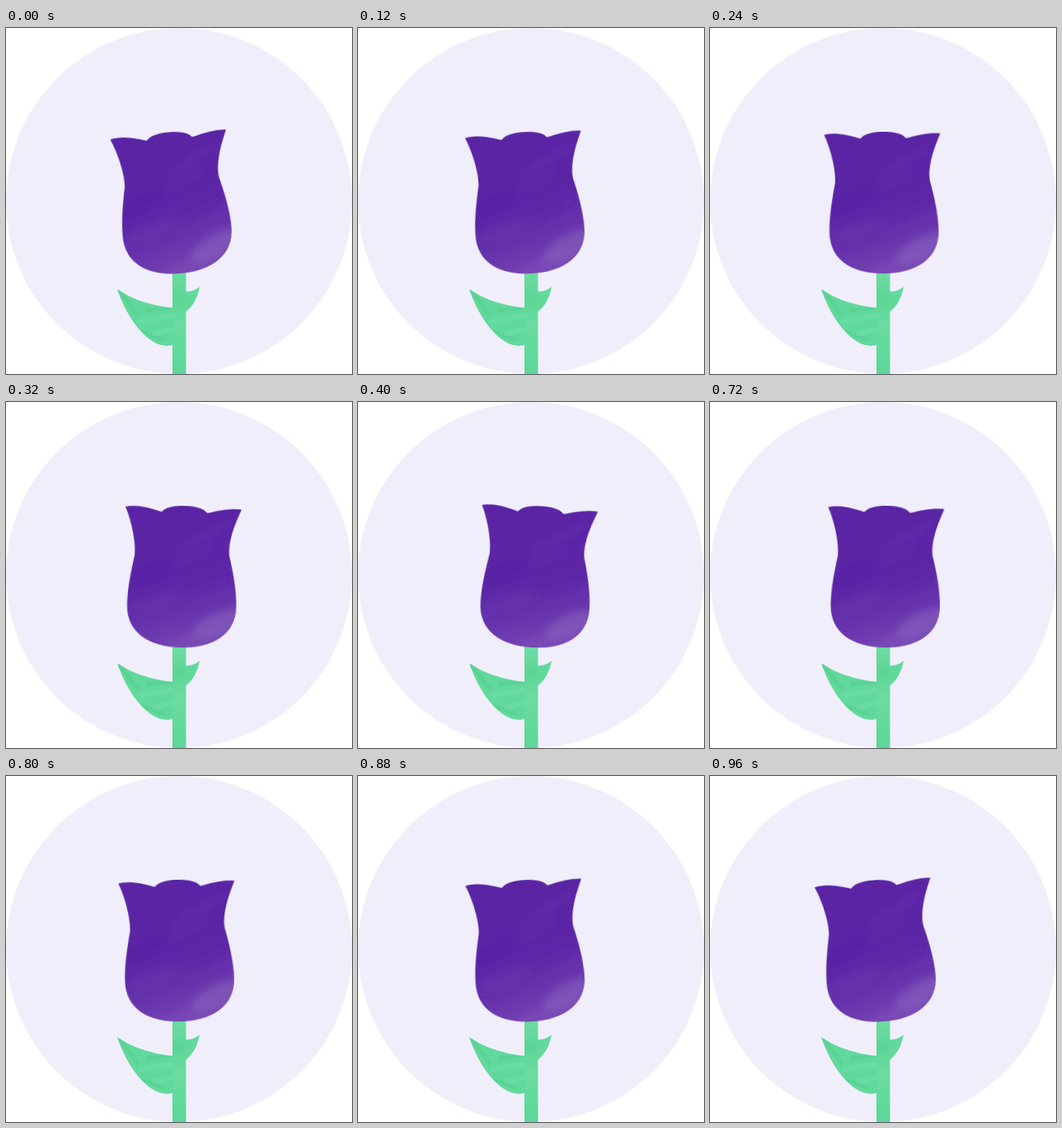
These frames come from a looping animation (420x420 px, 1 s). An HTML page:

```html
<!DOCTYPE html>
<html lang="en">
<head>
<meta charset="utf-8">
<title>Swaying tulip</title>
<style>
  html, body { margin: 0; width: 100%; height: 100%; overflow: hidden; background: #fff; }
  svg { display: block; width: 100%; height: 100%; }
  .bloom {
    transform-origin: 211px 297px;
    animation: sway 1s cubic-bezier(.364, 0, .636, 1) infinite;
  }
  @keyframes sway {
    0%, 100% { transform: rotate(-4.7deg); }
    52% { transform: rotate(4.7deg); }
  }
</style>
</head>
<body>
<svg viewBox="0 0 420 420">
  <defs>
    <linearGradient id="petal" gradientUnits="userSpaceOnUse" x1="185" y1="128" x2="242" y2="298">
      <stop offset="0" stop-color="#5a24a4"/>
      <stop offset=".48" stop-color="#5b25a6"/>
      <stop offset=".72" stop-color="#6632ac"/>
      <stop offset="1" stop-color="#7746b3"/>
    </linearGradient>
    <linearGradient id="stem" gradientUnits="userSpaceOnUse" x1="0" y1="298" x2="0" y2="420">
      <stop offset="0" stop-color="#6cdca2"/>
      <stop offset=".25" stop-color="#5dd596"/>
      <stop offset=".5" stop-color="#69dca1"/>
      <stop offset="1" stop-color="#5ed699"/>
    </linearGradient>
    <filter id="soft" x="-50%" y="-100%" width="200%" height="300%">
      <feGaussianBlur stdDeviation="4"/>
    </filter>
    <path id="head" d="M140 129 C153 126 168 129 184 134 C190 127 202 126 211.5 126
      C222 126 234 127 239.5 134 C255 130 268 127 281 128.6
      C276 141 265 166 268 186 C272 201 278 226 278 247
      C278 281 250 298 211.5 298 C172 298 145.5 281 145.5 247
      C145.5 227 149 208 153 187 C154 170 147 144 140 129Z"/>
    <path id="leaves" d="M135 317 C154 330 177 337 203 340 V384
      C198 387 190 386 183 383 C162 373 145 346 135 317Z
      M235 314 C229 319 224 320 217 320 V345 C227 339 233 326 235 314Z"/>
    <clipPath id="headClip"><use href="#head"/></clipPath>
    <clipPath id="leafClip"><use href="#leaves"/></clipPath>
  </defs>

  <circle cx="210" cy="210" r="210" fill="#f0eefa"/>

  <rect x="202" y="290" width="16.5" height="130" fill="url(#stem)"/>
  <use href="#leaves" fill="#62d99c"/>
  <g clip-path="url(#leafClip)" fill="none" stroke-linecap="round">
    <path d="M138 320 L160 348 M172 343 L201 339 M166 369 L190 378" stroke="#54d08f" stroke-width="5" opacity=".55"/>
    <path d="M163 356 L201 350 M180 371 L202 366" stroke="#70dfa8" stroke-width="6" opacity=".5"/>
  </g>

  <g class="bloom">
    <use href="#head" fill="url(#petal)"/>
    <g clip-path="url(#headClip)">
      <g filter="url(#soft)">
        <g fill="#6d3bb0">
          <ellipse cx="236" cy="163" rx="38" ry="7" opacity=".22" transform="rotate(-28 236 163)"/>
          <ellipse cx="214" cy="192" rx="42" ry="5" opacity=".2" transform="rotate(-24 214 192)"/>
          <ellipse cx="178" cy="246" rx="36" ry="9" opacity=".3" transform="rotate(-18 178 246)"/>
        </g>
        <g fill="#51209f">
          <ellipse cx="176" cy="208" rx="30" ry="6" opacity=".4" transform="rotate(-24 176 208)"/>
          <ellipse cx="240" cy="222" rx="34" ry="5" opacity=".3" transform="rotate(-20 240 222)"/>
        </g>
        <g fill="#875fbd">
          <ellipse cx="259" cy="267" rx="36" ry="13" opacity=".6" transform="rotate(-24 259 267)"/>
          <ellipse cx="230" cy="288" rx="38" ry="8" opacity=".3" transform="rotate(-14 230 288)"/>
        </g>
      </g>
    </g>
  </g>
</svg>
</body>
</html>
```
